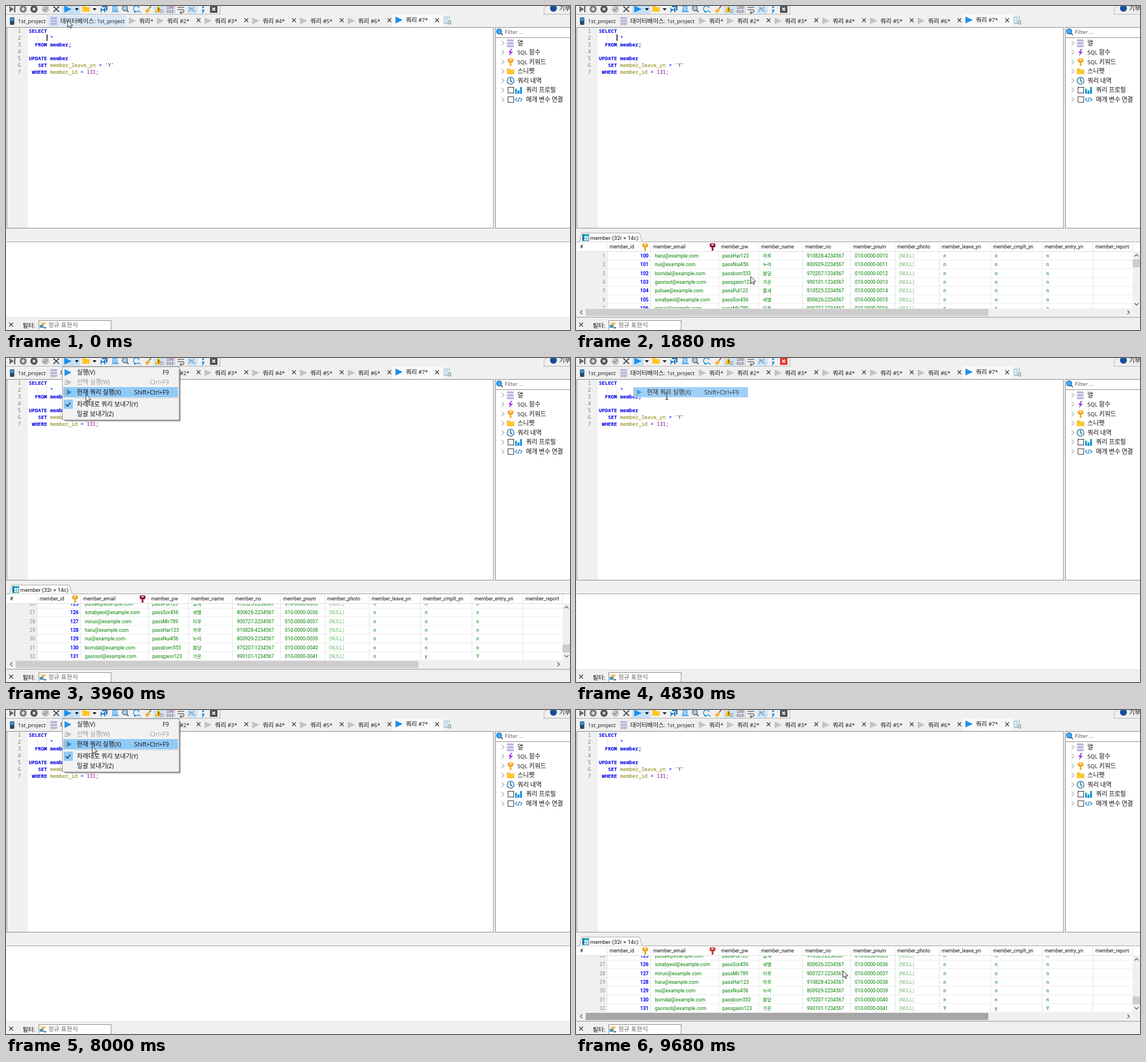
An HTML page for the animation above (9710 ms loop, 987 by 568 pixels).

```html
<!DOCTYPE html>
<html lang="ko">
<head>
<meta charset="utf-8">
<title>SQL editor</title>
<style>
html, body { margin: 0; width: 100%; height: 100%; overflow: hidden; background: #f0f0f0; }
svg { display: block; width: 100vw; height: 100vh; }
text { font: 9.5px "Open Sans", "Noto Sans CJK KR", sans-serif; fill: #111; }
.ko { font-family: "Noto Sans CJK KR", "Noto Sans CJK JP", sans-serif; font-size: 1.13em; }
.menu text { font-size: 10.1px; }
.menu .ko { font-size: 1.08em; }
.off text { fill: #999; }
.code text { font: 8.87px "Noto Sans Mono", monospace; fill: #0000ff; }
.code .key { font-weight: bold; fill: #0000e6; }
.code .name { fill: #808000; }
.code .str { fill: #333; }
.code .num { fill: #800080; }
.code .line { fill: #777; text-anchor: end; }
.grid text { font: 8.6px Roboto, "Noto Sans CJK KR", sans-serif; }
.grid .ko { font-size: .95em; }
.cells text { fill: #008000; }
.cells .id { fill: #0000ff; font-weight: bold; text-anchor: end; }
.cells .row { fill: #888; text-anchor: end; }
.cells .null { fill: #74b874; }
.end { text-anchor: end; }
</style>
</head>
<body>
<svg id="stage" viewBox="0 0 987 568"></svg>
<script>
const LOOP = 9710;
const GRAY = '#6b6b6b', BLUE = '#1e90e8', SELECT = '#91c9f7';

// Markup helpers
const text = (x, y, s, cls = '', style = '') => `<text x="${x}" y="${y}" class="${cls}" style="${style}">` +
  s.replace(/[가-힣]+/g, '<tspan class="ko">$&</tspan>') + '</text>';
const rect = (x, y, w, h, fill, stroke = 'none', more = '') =>
  `<rect x="${x}" y="${y}" width="${w}" height="${h}" fill="${fill}" stroke="${stroke}" ${more}/>`;
const circle = (x, y, r, fill, stroke = 'none', w = 1) =>
  `<circle cx="${x}" cy="${y}" r="${r}" fill="${fill}" stroke="${stroke}" stroke-width="${w}"/>`;
const fillPath = (d, fill) => `<path d="${d}" fill="${fill}"/>`;
const line = (d, color, w = 1) => `<path d="${d}" fill="none" stroke="${color}" stroke-width="${w}"/>`;
const group = (id, body, more = '') => `<g id="${id}" ${more}>${body}</g>`;
const play = (x, y, color, w = 13, h = 12) => fillPath(`M${x} ${y - h / 2}l${w} ${h / 2}l${-w} ${h / 2}z`, color);
const cross = (x, y, r, color, w = 1.3) =>
  line(`M${x - r} ${y - r}l${2 * r} ${2 * r}m0 ${-2 * r}l${-2 * r} ${2 * r}`, color, w);
const check = (x, y, color) => line(`M${x - 4} ${y}l3 3l5 -6`, color, 1.3);
const dropArrow = x => fillPath(`M${x - 3.5} 4h7l-3.5 4z`, '#111');
const lens = (x, y, r, color, fill) => circle(x, y, r, fill, color, 1.4) +
  line(`M${x + r * .7} ${y + r * .7}l3.2 3.2`, '#555', 2);
const folder = (x, y) => fillPath(`M${x} ${y - 5}h5l1.5 2h6.5v8h-13z`, '#ffc526');
const keyIcon = (x, y, color, id = '') => `<g id="${id}" fill="${color}">` +
  `<rect x="${x - 5}" y="${y - 6}" width="10" height="7" rx="2.5"/><path d="M${x - 1.5} ${y}h3v7h-3z"/>` +
  `<rect x="${x - 2}" y="${y - 4.5}" width="4" height="2" fill="#fff"/></g>`;
const stack = (x, y) => [0, 5, 10].map(d => rect(x, y + d, 12, 3.7, '#bdb3dc', 'none', 'rx="1"')).join('');

function toolbar() {
  const disc = (x, color) => circle(x, 5.5, 6.3, color);
  return group('runButton', rect(98, 0, 32, 13.5, '#c5e1f6')) +
    rect(258, 0, 39, 13.5, '#cbe4f7') + rect(317, 0, 18, 13.5, '#cbe4f7') +
    line('M0 14.5H374.5V0M946 0L941.5 4V14.5H987', '#b4b4b4') +
    play(6, 5.5, GRAY, 8, 11) + rect(14, 0, 2.5, 11, GRAY) +
    disc(30, '#808080') + line('M27 5.5h6m-3 -3v6', '#fff', 1.6) +
    disc(49, '#505050') + cross(49, 5.5, 2.3, '#fff', 1.5) +
    disc(69, '#c4c4c4') + check(68.5, 5.5, '#888') + cross(88, 5.5, 5, '#505050', 2) +
    play(102, 5.5, BLUE) + dropArrow(124) + folder(133.5, 5) + dropArrow(155) +
    rect(168, 0, 9.5, 8, '#1f6fb8') + rect(165, 2.5, 9.5, 9, '#2578c4', '#f0f0f0') +
    rect(167, 3, 5, 2.5, '#d5e8f7') + rect(167.5, 8, 4.5, 3, '#fff') +
    fillPath('M186 0h9v8h2v3h-12v-3h1z', '#6ab7ec') + line('M188 3h5m-5 3h5', '#fff') +
    lens(208, 4, 4.5, '#666', '#9fd0f5') + line('M232 8a5 5 0 1 1 1 -4m-1 4l3 3.5M224 10l4 1', BLUE, 1.4) +
    fillPath('M243 8l5 -4l4 4l-5 5z', '#f4b73b') + line('M250 5l4 -5', '#a0672b', 2) +
    fillPath('M267 -1l6.5 12h-13z', '#ffb900') + line('M267 3v4m0 1.3v1.2', '#333', 1.4) +
    circle(272, 9, 2.5, '#e8e8e8', '#777') +
    ['100', '010'].map((bits, i) => text(281, 4.5 + 7.5 * i, bits, '', 'font:7px Liberation Mono,monospace;fill:#a33')).join('') +
    line('M300 2.5h12M300 6.5h9a2.5 2.5 0 0 1 0 5h-4m2 -2.2l-2.2 2.2l2.2 2.2', GRAY, 1.5) +
    line('M320 10l3 -7l3 5l3 -7M321 3h3m4 6h3', '#7890a4', 1.3) +
    circle(345, 2, 1.8, BLUE) + fillPath('M343.3 6h3.5v3l-2.5 4h-1.5l1.2 -3.5h-.7z', BLUE) +
    group('stop', rect(357, 0, 13, 12, 'inherit'), 'fill="#505050"') + cross(363.5, 5.5, 2.6, '#fff', 1.5) +
    circle(958, 4, 6, '#12509b') + text(968, 8, '기부');
}

function tabs() {
  let out = group('hover', rect(73, 16, 137, 20, '#d9e9f7')) + rect(676, 14.5, 88, 22, '#f9f9f9') +
    rect(7, 20, 7.5, 13, '#30485f', 'none', 'rx="1"') + rect(8, 21, 5.5, 5, '#2b9be6') +
    text(21, 30, '1st_project') + stack(77.5, 19.5) + text(95, 30, '데이터베이스: 1st_project') +
    play(215, 26, '#c3c3c3') + text(233, 30, '쿼리*');
  for (let n = 2; n <= 7; n++) {
    const x = 264 + (n - 2) * 83.5, active = n === 7;
    out += play(x, active ? 24.5 : 26, active ? BLUE : '#c3c3c3') +
      text(x + 18, active ? 28 : 30, `쿼리 #${n}*`) + cross(x + 73, 25, 3.3, '#222', 1.2);
  }
  return out + rect(767, 19.5, 9, 11, '#fff', '#7da7c7') + line('M769 22.5h5m-5 3h5m-5 3h3', '#52a5dc') +
    circle(776, 29, 2.7, '#e8f4e8', '#5f7c6b');
}

function editor() {
  const code = [
    [1, 0, 'SELECT', 'key'], [2, 7, '*'], [3, 2, 'FROM', 'key'], [3, 7, 'member;', 'key'],
    [5, 0, 'UPDATE', 'key'], [5, 7, 'member', 'key'], [6, 3, 'SET', 'key'],
    [6, 7, 'member_leave_yn', 'name'], [6, 23, '='], [6, 25, "'Y'", 'str'], [7, 1, 'WHERE', 'key'],
    [7, 7, 'member_id', 'name'], [7, 17, '='], [7, 19, '131', 'num'], [7, 22, ';']
  ];
  const numbers = [1, 2, 3, 4, 5, 6, 7].map(n => text(26, 35 + 12 * n, '' + n, 'line')).join('');
  return rect(1.5, 37.5, 851.5, 352, '#fff', '#8c8c8c') + rect(2, 38, 36, 351, '#f0f0f0') +
    line('M55.5 50v12M71.5 50v12', '#ddd') +
    group('', numbers + code.map(([n, col, s, cls]) => text(40 + col * 5.325, 35 + 12 * n, s, cls)).join(''), 'class="code"') +
    group('caret', rect(0, 0, 1.5, 11, '#000'));
}

function sidePanel() {
  const labels = ['열', 'SQL 함수', 'SQL 키워드', '스니펫', '쿼리 내역', '쿼리 프로필', '매개 변수 연결'];
  const icons = [
    stack(876.5, 58.5), fillPath('M884 75l-5 7h3l-2 6l7 -8h-4l3 -5z', '#a43be0'),
    keyIcon(883, 98, '#f2a91c'), folder(876.5, 114.5),
    circle(883, 131, 6, '#e8f5fc', '#2580a8', 1.4) + line('M883 127v4l2.5 2.5', '#234', 1.2),
    rect(891, 145, 3, 9, '#1a9ad6') + rect(895, 148, 3.5, 6, '#1a9ad6') + rect(899.5, 142, 3.5, 12, '#1a9ad6'),
    line('M894.5 161l-3 3l3 3M900 161l3 3l-3 3M898.5 160l-2.5 8', '#2580c8', 1.4)
  ];
  const rows = labels.map((label, i) => {
    const y = 65 + i * 16.5, boxed = i > 4;
    return line(`M867.5 ${y - 4}l4 4l-4 4`, '#777') + icons[i] + text(boxed ? 910 : 895, y + 3.5, label, '', 'font-size:9.6px') +
      (boxed ? rect(878.5, y - 5, 10, 10, '#fff', '#333') : '');
  });
  return rect(856.5, 37.5, 140, 352, '#fff', '#8c8c8c') + line('M857 55.5h130', '#8c8c8c') +
    lens(863, 44.5, 4.5, '#2473b4', '#4da9ee') + text(873, 49, 'Filter ...', '', 'font-size:9.7px;fill:#555') + rows.join('');
}

function bottom() {
  return rect(1, 414, 986, 132, '#fff') + line('M1 413.5h986', '#a5a5a5') + line('M0 546.5h987', '#dcdcdc') +
    cross(9, 558.5, 3.3, '#222', 1.2) + text(29, 563.5, '필터:') +
    rect(57.5, 551.5, 126.5, 20, '#fff', '#8c8c8c') + fillPath('M60 555h10l-4 5v4l-3 -2v-3z', '#f4b840') +
    rect(59, 559, 6, 5, '#3295d6') + fillPath('M65 563h6l-3 3z', '#555') +
    text(74, 563, '정규 표현식', '', 'fill:#666');
}

// Result grid
const PITCH = 15.27, ROWS = 32, SCROLL_RANGE = 388.8;
const HEADERS = [[7, '#'], [59, 'member_id'], [135, 'member_email'], [254, 'member_pw'], [324, 'member_name'],
  [401, 'member_no'], [485, 'member_pnum'], [562, 'member_photo'], [640, 'member_leave_yn'],
  [730, 'member_cmplt_yn'], [820, 'member_entry_yn'], [909, 'member_report']];
const EDGES = [54, 130, 249, 319, 396, 480, 558, 635, 725, 815, 904, 974];
const PEOPLE = [['pulsae', 'Pul123', '풀새', '910525-2234567'], ['sorabyeol', 'Sor456', '새별', '800626-2234567'],
  ['miruo', 'Mir789', '미루', '900727-2234567'], ['haru', 'Har123', '하루', '910828-4234567'],
  ['nui', 'Nui456', '누리', '800929-2234567'], ['bomdal', 'bom553', '봄달', '970207-1234567'],
  ['gaonsol', 'gaon123', '가온', '990101-1234567']];

function gridRow(n) {
  const y = 525.8 - (ROWS - n) * PITCH, last = n === ROWS;
  const [user, pass, name, number] = PEOPLE[(n + 2) % 7];
  return text(51, y, '' + n, 'row') + text(127, y, '' + (n + 99), 'id') +
    text(138, y, user + '@example.com') + text(256, y, 'pass' + pass) + text(327, y, name) +
    text(404, y, number) + text(488, y, '010-0000-00' + (n + 9)) + text(565, y, '(NULL)', 'null') +
    (last ? `<text id="leave" x="643" y="${y}"></text>` : text(643, y, 'n')) +
    text(733, y, last ? 'y' : 'n') + text(823, y, last ? 'Y' : 'n') +
    line(`M2 ${y + 4.2}H974`, '#ececec');
}

function results() {
  const rows = Array.from({ length: ROWS }, (_, i) => gridRow(i + 1)).join('');
  return fillPath('M6 413.5l4 -15.5h101l5 15.5z', '#fff') + line('M6 413.5l4 -15.5h101l5 15.5', '#a5a5a5') +
    rect(11.5, 400.5, 11, 11, '#d6f0fa', '#1787a8') + rect(11, 400, 12, 3, '#17a0c8') + rect(11, 400, 3.5, 12, '#17789c') +
    line('M18.5 403v9M14 407.5h9', '#5bb4cf') + text(25, 410, 'member (32r × 14c)', '', 'font-size:9.6px') +
    rect(1, 431, 53, 99, '#f0f0f0') +
    `<g clip-path="url(#body)">${group('rows', rows, 'class="cells"')}</g>` +
    line('M1 430.5h973', '#ddd') + line(EDGES.map(x => `M${x + .5} 415V530`).join(''), '#e4e4e4') +
    HEADERS.map(([x, s]) => text(x, 425, s)).join('') +
    keyIcon(121, 422, '#e9a71c') + keyIcon(239, 422, 'inherit', 'foreignKey') +
    rect(974, 430, 13, 100, '#f0f0f0') + group('thumb', rect(974, 0, 13, 14, '#cdcdcd')) +
    line('M977.5 439l3.5 -3.5l3.5 3.5M977.5 521l3.5 3.5l3.5 -3.5', '#555', 1.2) +
    rect(1, 530, 986, 15, '#f0f0f0') + group('bar', rect(17, 531, 704.5, 12.5, 'inherit')) +
    line('M11 533.5l-3.5 3.5l3.5 3.5M965 533.5l3.5 3.5l-3.5 3.5', '#555', 1.2) + line('M1 545.5h986', '#a5a5a5');
}

// Run menu: [centre, top, height, label, shortcut]
const ITEMS = [[25.5, 17, 17, '실행(V)', 'F9'], [42.5, 34, 17, '선택 실행(W)', 'Ctrl+F9'],
  [60, 51, 18, '현재 쿼리 실행(X)', 'Shift+Ctrl+F9'], [81, 72, 18, '차례대로 쿼리 보내기(Y)', ''],
  [98, 90, 17, '일괄 보내기(Z)', '']];
const itemBack = i => rect(100, ITEMS[i][1], 201, ITEMS[i][2], SELECT);
const pageIcon = (y, page, arrow) => line(`M102.5 ${y - 3.5}h6m-6 3.5h6m-6 3.5h6`, page, 1.6) + play(107, y, arrow, 8, 10);
const itemIcons = [play(102.5, 25.5, BLUE, 12), pageIcon(42.5, '#bbb', '#c3c3c3'), pageIcon(60, '#c7a24e', BLUE),
  rect(101, 73, 16, 16, SELECT) + check(108.5, 81.5, '#123'), ''];
const itemFace = i => group('', itemIcons[i] + text(124, ITEMS[i][0] + 3.6, ITEMS[i][3]) +
  text(285, ITEMS[i][0] + 3.6, ITEMS[i][4], 'end'), i === 1 ? 'class="off"' : '');

function menu() {
  return rect(102, 19, 204, 92.5, '#000', 'none', 'opacity=".18" rx="2"') + rect(103, 20, 202, 90.5, '#000', 'none', 'opacity=".3"') +
    rect(98.5, 15.5, 204.5, 93, '#f2f2f2', '#a0a0a0') + line('M120 70.5h180', '#d2d2d2') +
    ITEMS.map((_, i) => group('back' + i, itemBack(i))).join('') + ITEMS.map((_, i) => itemFace(i)).join('');
}

const pointer = group('arrow', '<path d="M0 0V12.5L2.9 9.8L5 14L6.8 13.2L4.8 9H8.8Z" fill="#fff" stroke="#111" stroke-width=".9"/>') +
  group('beam', line('M-2.5 -5.5h2l.5 .5l.5 -.5h2M0 -5V5M-2.5 5.5h2l.5 -.5l.5 .5h2', '#222', 1.1));

document.getElementById('stage').innerHTML =
  '<clipPath id="body"><rect x="1" y="430" width="973" height="100"/></clipPath>' +
  rect(0, 0, 987, 568, '#f0f0f0') + toolbar() + tabs() + editor() + sidePanel() + bottom() +
  group('results', results(), 'class="grid"') + group('menu', menu(), 'class="menu"') +
  group('chosen', itemBack(2) + itemFace(2), 'class="menu"') +
  group('click', circle(153, 62, 10, '#ffe92e') + circle(160, 61, 4, '#fff', '#3a8fd0', 2.5), 'opacity=".85"') +
  group('mouse', pointer);

const el = {};
document.querySelectorAll('[id]').forEach(e => { el[e.id] = e; });
const show = (e, on) => { e.style.display = on ? '' : 'none'; };
const move = (e, x, y) => e.setAttribute('transform', `translate(${x} ${y})`);
const clamp = v => Math.min(1, Math.max(0, v));

// Pointer stops: time, x, y
const STOPS = [[0, 108, 25], [30, 108, 25], [60, 123, 7], [400, 123, 7], [650, 150, 84], [810, 150, 84], [960, 151, 64],
  [1500, 151, 64], [1910, 308, 480], [2600, 308, 480], [2890, 242, 147], [3150, 112, 93], [3350, 112, 93],
  [3570, 123, 7], [3750, 123, 7], [4110, 150, 98], [4340, 150, 98], [4590, 151, 64], [4800, 151, 64],
  [4830, 159, 67], [5300, 159, 67], [5750, 180, 125], [5780, 180, 125], [6150, 86, 57], [6300, 86, 57],
  [6500, 125, 43], [6750, 135, 26], [6780, 135, 26], [6950, 123, 7], [7450, 123, 7], [7800, 151, 105],
  [8000, 151, 64], [8210, 151, 64], [8240, 159, 67], [9080, 159, 67], [9380, 300, 530], [9680, 467, 457], [LOOP, 467, 457]];
// Menu opens, item is clicked, query ends
const RUNS = [[310, 1180, 1500], [3640, 4800, 5300], [7300, 8210, 8500]];
// Caret shown: from, to, x, y
const CARETS = [[0, 2150, 71, 50], [3150, 3450, 109, 86], [6180, 6900, 81.5, 50], [8500, 9110, 81.5, 50]];

function pointerAt(t) {
  const i = STOPS.findIndex(s => s[0] > t), [t0, x0, y0] = STOPS[i - 1], [t1, x1, y1] = STOPS[i];
  const p = (t - t0) / (t1 - t0), e = p * p * (3 - 2 * p);
  return [x0 + (x1 - x0) * e, y0 + (y1 - y0) * e];
}

function render(t) {
  const [x, y] = pointerAt(t);
  const [open, click, done] = RUNS.findLast(r => r[0] <= t) || [Infinity, Infinity, Infinity];
  const menuOpen = t >= open && t < click + 30;
  const running = t >= click + 20 && t < done;
  const secondResult = t >= 8500;

  show(el.menu, menuOpen);
  el.menu.style.opacity = clamp((t - open + 30) / 150);
  ITEMS.forEach(([, top, h], i) =>
    show(el['back' + i], t < click && x > 100 && y >= top && y < top + h));
  show(el.click, t >= click && t < click + 30);
  show(el.chosen, t >= click + 30 && t < click + 220);
  el.chosen.style.opacity = clamp(1 - (t - click) / 220);

  el.runButton.firstChild.setAttribute('width', running ? 20 : 32);
  el.stop.setAttribute('fill', running ? '#e5342b' : '#505050');
  show(el.hover, !menuOpen && x > 73 && x < 210 && y > 16 && y < 36);

  const caret = CARETS.find(c => t >= c[0] && t < c[1]);
  show(el.caret, caret);
  if (caret) move(el.caret, caret[2], caret[3]);

  show(el.results, (t >= 1500 && t < 4800) || secondResult);
  const scroll = Math.floor(clamp((t - 2120) / 320) * 7) / 7;
  move(el.rows, 0, SCROLL_RANGE * (1 - scroll));
  move(el.thumb, 0, 444 + 58 * scroll);
  el.leave.textContent = secondResult ? 'Y' : 'n';
  el.foreignKey.setAttribute('fill', secondResult ? '#c8392b' : '#8b1638');
  el.bar.setAttribute('fill', secondResult ? '#a6a6a6' : '#cdcdcd');

  const inEditor = !menuOpen && x > 38 && x < 853 && y > 37 && y < 390;
  show(el.arrow, !inEditor);
  show(el.beam, inEditor);
  move(el.mouse, x, y);
}

const start = performance.now();
(function frame() {
  render((performance.now() - start) % LOOP);
  requestAnimationFrame(frame);
})();
</script>
</body>
</html>
```
